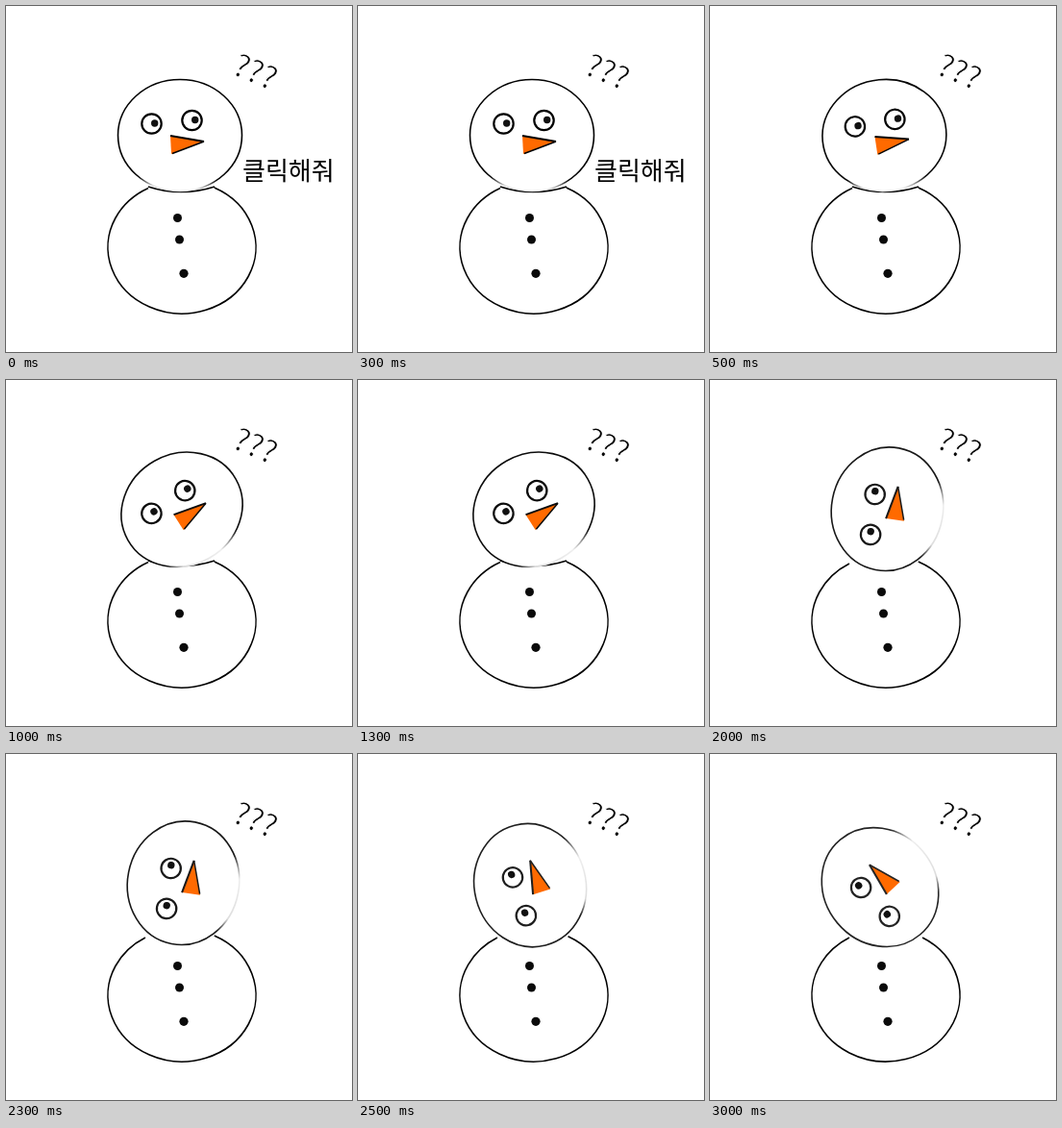
Animation of 360x360 px, one loop 3500 ms. Source, as an HTML page with a canvas:

```html
<!DOCTYPE html>
<html lang="ko">
<head>
<meta charset="utf-8">
<style>
  html, body { margin: 0; width: 100%; height: 100%; overflow: hidden; background: #fff; }
  canvas { display: block; width: 360px; height: 360px; }
</style>
</head>
<body>
<canvas id="stage" width="360" height="360"></canvas>
<script>
const ctx = document.getElementById('stage').getContext('2d');
const STEP = 500;
const RAD = Math.PI / 180;
const FONT = '"Noto Sans CJK KR", "Noto Sans CJK", "Noto Sans", sans-serif';

// Head centre and tilt in degrees for each held pose
const poses = [
  { x: 181, y: 134.5, tilt: 0 },
  { x: 181.4, y: 134.5, tilt: -5.5 },
  { x: 183, y: 134.8, tilt: -29.5 },
  { x: 184, y: 134.7, tilt: -49 },
  { x: 184.5, y: 134.2, tilt: -79 },
  { x: 179.1, y: 136.6, tilt: -104.5 },
  { x: 177, y: 138.6, tilt: -130 }
];

function arc(x, y, rx, ry, from, to, color, width) {
  ctx.beginPath();
  ctx.ellipse(x, y, rx, ry, 0, from * RAD, to * RAD);
  ctx.strokeStyle = color;
  ctx.lineWidth = width;
  ctx.stroke();
}

function disc(x, y, rx, color, ry = rx) {
  ctx.beginPath();
  ctx.ellipse(x, y, rx, ry, 0, 0, 2 * Math.PI);
  ctx.fillStyle = color;
  ctx.fill();
}

function line(color, width, x1, y1, x2, y2) {
  ctx.beginPath();
  ctx.moveTo(x1, y1);
  ctx.lineTo(x2, y2);
  ctx.strokeStyle = color;
  ctx.lineWidth = width;
  ctx.stroke();
}

function curve(x1, y1, cx, cy, x2, y2) {
  ctx.beginPath();
  ctx.moveTo(x1, y1);
  ctx.quadraticCurveTo(cx, cy, x2, y2);
  ctx.strokeStyle = '#000';
  ctx.lineWidth = 1.5;
  ctx.stroke();
}

function drawBody(pose) {
  const rightEnd = [-64, -64, -64, -64, -64, -62.5, -60.4][pose];
  const leftEnd = pose < 3 ? 243 : 240.4;
  arc(183, 251, 77, 69, rightEnd, leftEnd, '#000', 1.6);
  if (pose < 3) curve(148, 188, 165, 193.5, 182, 193.5);
  if (pose < 4) curve(182, 193.5, 200, 193.5, 217, 188);
  disc(178.5, 220.5, 4.5, '#0a0a0a');
  disc(180.5, 243, 4.5, '#0a0a0a');
  disc(185, 278.3, 4.6, '#0a0a0a');
}

function drawEye(x, y, ink) {
  arc(x, y, 10.2, 10.2, 0, 360, ink, 2.2);
  disc(x + 3.2, y - 0.5, 3.7, '#111');
}

function drawNose(ink) {
  ctx.beginPath();
  ctx.moveTo(-10, 0.5);
  ctx.lineTo(25, 6.5);
  ctx.lineTo(-9, 19.5);
  ctx.closePath();
  ctx.fillStyle = '#ff6a00';
  ctx.fill();
  line(ink, 2, -10, 0.5, 25, 6.5);
  line(ink, 1.5, 25, 6.5, -8, 19);
}

// The outline fades out around the chin
function outlineInk(ink) {
  const gradient = ctx.createConicGradient(0, 0, 0);
  gradient.addColorStop(50 / 360, ink);
  gradient.addColorStop(65 / 360, '#aaa');
  gradient.addColorStop(75 / 360, '#eee');
  gradient.addColorStop(118 / 360, '#ddd');
  gradient.addColorStop(135 / 360, ink);
  return gradient;
}

function drawHead(pose) {
  const { x, y, tilt } = poses[pose];
  const gray = pose * 6;
  const ink = `rgb(${gray},${gray},${gray})`;
  ctx.save();
  ctx.translate(x, y);
  ctx.rotate(tilt * RAD);
  disc(0, 0, 64.5, '#fff', 58);
  arc(0, 0, 64.5, 58, 0, 360, outlineInk(ink), 1.6);
  // Each turn leaves the face a little softer
  if (pose) ctx.filter = `blur(${0.3 + pose * 0.08}px)`;
  drawEye(-29.5, -12, ink);
  drawEye(12.5, -15.5, ink);
  drawNose(ink);
  ctx.restore();
}

function drawText(pose) {
  ctx.fillStyle = '#000';
  ctx.save();
  ctx.translate(259.5, 68.5);
  ctx.rotate(23 * RAD);
  ctx.font = `300 32px ${FONT}`;
  ctx.textAlign = 'center';
  ctx.fillText('???', 0, 11.5);
  // A white edge thins the strokes
  ctx.strokeStyle = '#fff';
  ctx.lineWidth = 0.9;
  ctx.strokeText('???', 0, 11.5);
  ctx.restore();
  if (pose === 0) {
    ctx.font = `400 26px ${FONT}`;
    ctx.textAlign = 'left';
    ctx.fillText('클릭해줘', 246, 181);
  }
}

function render(now) {
  const pose = Math.floor(now / STEP) % poses.length;
  ctx.fillStyle = '#fff';
  ctx.fillRect(0, 0, 360, 360);
  drawBody(pose);
  drawHead(pose);
  drawText(pose);
}

let start;
function tick(now) {
  start ??= now;
  render(now - start);
  requestAnimationFrame(tick);
}
render(0);
requestAnimationFrame(tick);
</script>
</body>
</html>
```
